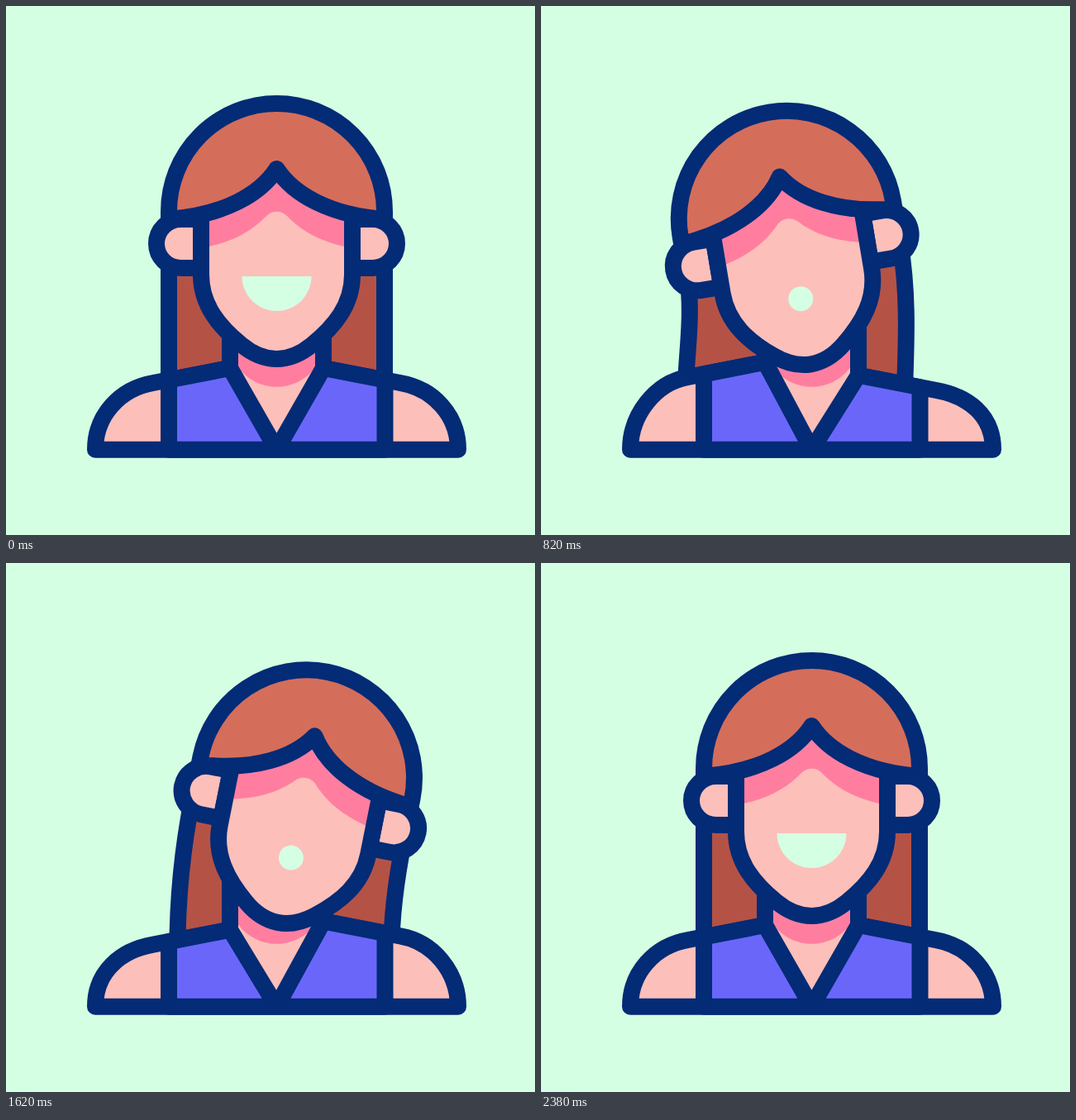
Animation of 640 by 640 pixels, one loop 2400 ms. Source, as an HTML page:

```html
<!DOCTYPE html>
<html lang="en">
<head>
<meta charset="utf-8">
<title>Swaying portrait</title>
<style>
  html, body { margin: 0; width: 100%; height: 100%; overflow: hidden; background: #d5ffe3; }
  svg { display: block; width: 100%; height: 100%; }
  .line { stroke: #032b76; stroke-width: 20; stroke-linejoin: round; }
  .skin { fill: #fdbfb9; }
  .shade { fill: #ff7ea0; }
  .hair { fill: #d56d5b; }
  .back { fill: #b55246; }
  .shirt { fill: #6a66fa; }
  .mouth { fill: #d5ffe3; }
</style>
</head>
<body>
<svg viewBox="0 0 640 640">
  <path id="back" class="back line"/>
  <path id="body" class="skin line"/>
  <path class="shade" d="M281 380H374V437.5A58 58 0 0 1 281 437.5Z"/>
  <path id="shirt" class="shirt line"/>
  <g id="head">
    <path class="skin line" d="M236 258H211.5A29.5 29.5 0 0 0 211.5 317H236Z"/>
    <path class="skin line" d="M419 258H443.5A29.5 29.5 0 0 1 443.5 317H419Z"/>
    <path class="skin" d="M236 245V325C236 362 258 388 285 410C296 419 310 427 327.5 427C345 427 359 419 370 410C397 388 419 362 419 325V245Z"/>
    <path class="shade" d="M327.5 197L236 245V293C275 286 299 271 315 254C322 247 333 247 340 254C356 271 380 286 419 293V245Z"/>
    <path class="line" fill="none" d="M236 250V325C236 362 258 388 285 410C296 419 310 427 327.5 427C345 427 359 419 370 410C397 388 419 362 419 325V250"/>
    <path class="hair line" d="M197 258V248.5A130.5 130.5 0 0 1 458 248.5V258C390 253 347 227 327.5 197C308 227 265 253 197 258Z"/>
    <path id="mouth" class="mouth"/>
  </g>
</svg>
<script>
  const LOOP = 2400, CX = 327.5, PIVOT = 432, BASE = 536.7;
  const part = id => document.getElementById(id);
  const [back, body, shirt, head, mouth] = ['back', 'body', 'shirt', 'head', 'mouth'].map(part);

  const mix = (a, b, k) => a + (b - a) * k;
  const ease = u => (1 - Math.cos(Math.PI * u)) / 2;

  // Eased value from [time, value] pairs
  function keyed(keys, t) {
    if (t <= keys[0][0]) return keys[0][1];
    for (let i = 1; i < keys.length; i++) {
      const [t0, a] = keys[i - 1], [t1, b] = keys[i];
      if (t < t1) return mix(a, b, ease((t - t0) / (t1 - t0)));
    }
    return keys[keys.length - 1][1];
  }

  const sway = (left, right) =>
    [[300, 0], [960, left], [1180, left], [1640, right], [1700, right], [2390, 0]];
  const TILT = sway(-10.6, 11.4);
  const SHRUG = sway(-9.8, 5.7);
  const SWING = sway(-25, 10.5);
  const BOB = [[100, 0], [420, 10], [560, 10], [1180, 0], [1280, 0], [1660, 8], [2050, 0]];
  const PUCKER = [[300, 0], [700, 1], [1960, 1], [2340, 0]];

  function drawBack(tilt, bob, swing) {
    const r = tilt * Math.PI / 180, c = Math.cos(r), s = Math.sin(r);
    const turn = (x, y) => {
      const dx = x - CX, dy = y - PIVOT;
      return [CX + dx * c - dy * s, PIVOT + dx * s + dy * c + bob];
    };
    // The strand on the raised side follows the head further down
    const strand = (x, bend, drift) =>
      [turn(x, 300), turn(x, 360 + bend), [x + drift, 430], [x + drift, 470]];
    const l = strand(197, 1.5 * tilt, swing);
    const q = strand(458, -1.5 * tilt, swing * 0.8).reverse();
    back.setAttribute('d', `M${l[0]}C${l.slice(1).join(' ')}L${q[0]}C${q.slice(1).join(' ')}Z`);
  }

  function drawBody(shrug) {
    // A shoulder rises less than it drops
    const shift = d => y => y + (d < 0 ? d * 0.82 : d);
    const l = shift(shrug), r = shift(-shrug);
    body.setAttribute('d',
      `M108 ${BASE}C108 495 138 ${l(463)} 178 ${l(456)}L271 ${l(438)}V370H384V${r(438)}` +
      `L477 ${r(456)}C517 ${r(463)} 547 495 547 ${BASE}Z`);
    shirt.setAttribute('d',
      `M197 ${BASE}V${l(452.5)}L271 ${l(438)}L${CX} ${BASE}L384 ${r(438)}L458.5 ${r(452.5)}V${BASE}Z`);
  }

  // Half-disc smile at k = 0, small circle at k = 1
  function drawMouth(k) {
    const w = mix(42, 15, k), side = mix(327, 347, k), top = mix(327, 332, k), low = mix(369, 362, k);
    const bend = w * 0.552, up = mix(0, 8.28, k), over = mix(20, 8.28, k);
    const x = mix(CX, 328.3, k), L = x - w, R = x + w;
    mouth.setAttribute('d',
      `M${L} ${side}C${L} ${side - up} ${x - over} ${top} ${x} ${top}` +
      `C${x + over} ${top} ${R} ${side - up} ${R} ${side}` +
      `C${R} ${side + bend} ${x + bend} ${low} ${x} ${low}` +
      `C${x - bend} ${low} ${L} ${side + bend} ${L} ${side}Z`);
  }

  function draw(now) {
    const t = now % LOOP;
    const tilt = keyed(TILT, t), bob = keyed(BOB, t);
    head.setAttribute('transform', `translate(0 ${bob}) rotate(${tilt} ${CX} ${PIVOT})`);
    drawBack(tilt, bob, keyed(SWING, t));
    drawBody(keyed(SHRUG, t));
    drawMouth(keyed(PUCKER, t));
  }

  const start = performance.now();
  function tick() {
    draw(performance.now() - start);
    requestAnimationFrame(tick);
  }
  tick();
</script>
</body>
</html>
```
